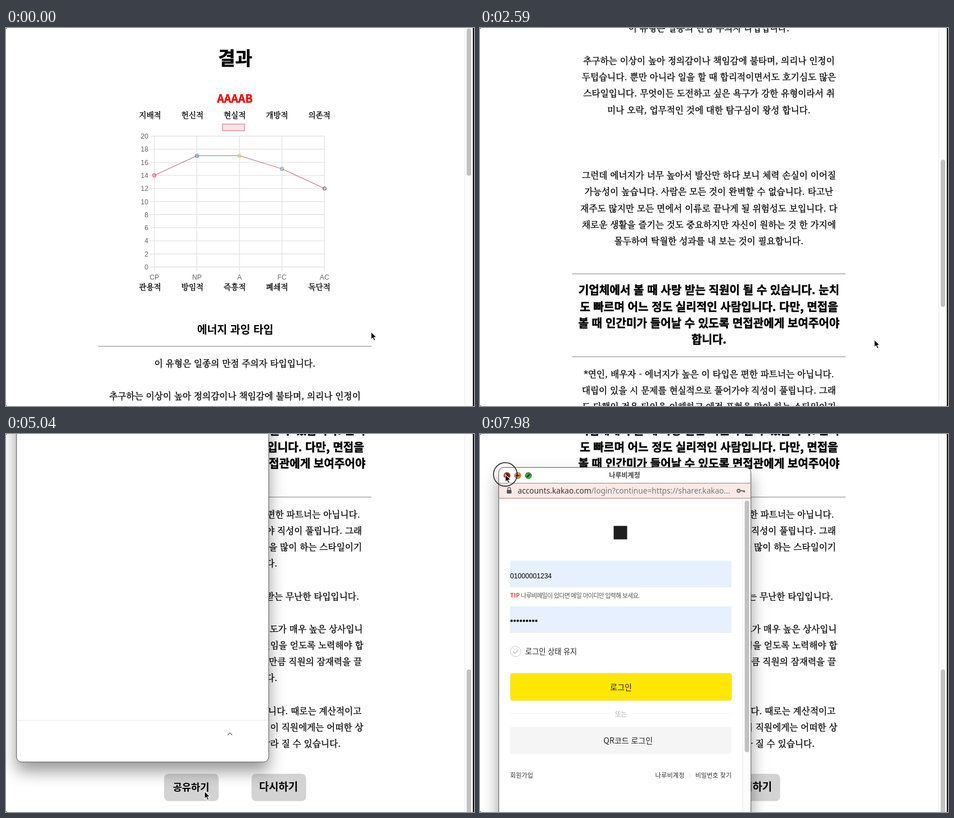
An HTML page that plays this animation: 832x673 px, repeating every 8 s.

```html
<!DOCTYPE html>
<html lang="ko">
<head>
<meta charset="utf-8">
<style>
html, body { margin: 0; width: 100%; height: 100%; overflow: hidden; background: #fff; }
svg { display: block; width: 832px; height: 673px; font-family: 'Noto Sans CJK KR', 'Noto Sans CJK', sans-serif; }
.serif { font-family: 'Noto Serif CJK KR', 'Noto Sans CJK KR', 'Noto Sans CJK', serif; stroke: #000; stroke-width: .4px; }
.pen { font-weight: 700; }
.heavy { font-weight: 900; stroke: currentColor; stroke-width: .5px; }
.red { fill: #f00b0b; color: #f00b0b; }
.arial { font-family: 'Liberation Sans', sans-serif; }
.url { font-family: 'Noto Sans', sans-serif; }
.shadow { filter: drop-shadow(0 16px 14px rgba(0, 0, 0, .4)); }
</style>
</head>
<body>
<svg id="stage" viewBox="0 0 832 673" text-anchor="middle"></svg>
<script>
const LOOP = 8000, STEP = 70, LINE = 29.17;
const LEFT = 'text-anchor="start"', RIGHT = 'text-anchor="end"';

// y is the vertical middle of the glyphs
const text = (x, y, str, size, attrs = '') =>
  `<text x="${x}" y="${y + size * .37}" font-size="${size}" ${attrs}>${str}</text>`;
const rect = (x, y, w, h, fill, attrs = '') =>
  `<rect x="${x}" y="${y}" width="${w}" height="${h}" fill="${fill}" ${attrs}/>`;
const line = (x1, y1, x2, y2, color, width = 1) =>
  `<path d="M${x1} ${y1}L${x2} ${y2}" stroke="${color}" stroke-width="${width}"/>`;
const paragraph = (y, size, cls, str) => str.split('\n')
  .map((row, i) => row && text(407, y + i * LINE, row, size, `class="${cls}"`)).join('');

function chart() {
  const X = i => 263.7 + i * 75.65, Y = v => 425.5 - v * 11.65;
  const values = [14, 17, 17, 15, 12];
  const colors = ['#d9626f', '#5a88b0', '#f2c05c', '#7299c4', '#84626f'];
  let out = rect(384.7, 171, 39.5, 12, '#ffe0e6', 'stroke="#c4727e"');
  for (let v = 0; v <= 20; v += 2)
    out += line(256, Y(v), X(4), Y(v), '#e4e4e4', 1.4) + text(253, Y(v), v, 12.2, `class="arial" fill="#666" ${RIGHT}`);
  ['CP', 'NP', 'A', 'FC', 'AC'].forEach((name, i) => {
    out += line(X(i), Y(20), X(i), 433, '#e4e4e4', 1.4) + text(X(i), 443, name, 12.2, 'class="arial" fill="#666"');
  });
  out += `<polyline points="${values.map((v, i) => X(i) + ',' + Y(v)).join(' ')}" fill="none" stroke="#c77d87" stroke-width="1.2"/>`;
  values.forEach((v, i) => {
    out += `<circle cx="${X(i)}" cy="${Y(v)}" r="3" fill="${colors[i]}" fill-opacity=".2" stroke="${colors[i]}" stroke-width="1.1"/>`;
  });
  const labels = (y, names) => names.split(' ')
    .map((name, i) => text(256.3 + i * 75.2, y, name, 13.6, 'class="serif"')).join('');
  return out + labels(155, '지배적 헌신적 현실적 개방적 의존적') + labels(461, '관용적 방임적 즉흥적 폐쇄적 독단적');
}

const page =
  text(407.5, 54, '결과', 33, 'class="heavy"') +
  text(407, 126, 'AAAAB', 19.6, 'class="heavy red"') + chart() +
  text(407.5, 537, '에너지 과잉 타입', 19.4, 'class="pen"') +
  [566.6, 1034.6, 1182.4].map(y => line(164, y, 650, y, '#999', 1.2)).join('') +
  paragraph(597, 15.65, 'serif', `이 유형은 일종의 만점 주의자 타입입니다.

추구하는 이상이 높아 정의감이나 책임감에 불타며, 의리나 인정이
두텁습니다. 뿐만 아니라 일을 할 때 합리적이면서도 호기심도 많은
스타일입니다. 무엇이든 도전하고 싶은 욕구가 강한 유형이라서 취
미나 오락, 업무적인 것에 대한 탐구심이 왕성 합니다.



그런데 에너지가 너무 높아서 발산만 하다 보니 체력 손실이 이어질
가능성이 높습니다. 사람은 모든 것이 완벽할 수 없습니다. 타고난
재주도 많지만 모든 면에서 이류로 끝나게 될 위험성도 보입니다. 다
채로운 생활을 즐기는 것도 중요하지만 자신이 원하는 것 한 가지에
몰두하여 탁월한 성과를 내 보는 것이 필요합니다.`) +
  paragraph(1064, 20.1, 'heavy', `기업체에서 볼 때 사랑 받는 직원이 될 수 있습니다. 눈치
도 빠르며 어느 정도 실리적인 사람입니다. 다만, 면접을
볼 때 인간미가 들어날 수 있도록 면접관에게 보여주어야
합니다.`) +
  paragraph(1213, 15.65, 'serif', `*연인, 배우자 - 에너지가 높은 이 타입은 편한 파트너는 아닙니다.
대립이 있을 시 문제를 현실적으로 풀어가야 직성이 풀립니다. 그래
도 다행인 것은 타인을 이해하고 애정 표현을 많이 하는 스타일이기
때문에 늘 즐겁습니다.

*거래처(고객) - 서로 줄건 주고, 받을 건 받는 무난한 타입입니다.

*상사 - 일에 대한 성과나 사람에 대한 관심도가 매우 높은 상사입니
다. 인간적인 역량과 업무적인 역량 모두 신임을 얻도록 노력해야 합
니다. 기대치가 높은 상사이기도 하지만 그만큼 직원의 잠재력을 끌
어 내주는 상사입니다.

*동료, 후배 직원 - 일은 똑 소리 나게 잘합니다. 때로는 계산적이고
타산적으로 비쳐 질 수도 있습니다. 하지만 이 직원에게는 어떠한 상
사를 만나느냐에 따라 성과가 매우 달라 질 수 있습니다.`) +
  rect(281, 1675, 97, 48.5, '#d3d3d3', 'rx="8"') + text(329, 1698, '공유하기', 17.6, 'class="pen"') +
  rect(436.5, 1675, 97, 48.5, '#d3d3d3', 'rx="8"') + text(484.5, 1698, '다시하기', 18.8, 'class="pen"');

const light = (x, fill, id) => `<circle ${id} cx="${x}" cy="-43.6" r="5.8" fill="${fill}" stroke="#0005"/>`;
const titleBar =
  text(242.5, -44.5, '나루비계정', 12, 'font-weight="700" fill="#444"') +
  light(33.4, '#e9573f', 'id="closeBtn"') + light(52.4, '#d98a35', '') + light(71.4, '#35a845', '') +
  `<path id="glyphs" d="M31 -46l4.8 4.8m0 -4.8l-4.8 4.8M49 -43.6h6.8M68.8 -41l5.2 -5.2" stroke="#2b1208" stroke-width="1.7"/>` +
  rect(19.5, -30, 447, 27.5, '#fbe9e7') + line(19.5, -30, 466.5, -30, '#8d8583') + line(19.5, -3, 466.5, -3, '#d5aaa6', 2) +
  rect(33, -18, 8.4, 6.5, '#555', 'rx="1"') + `<path d="M34.8 -18v-2a2.4 2.4 0 0 1 4.8 0v2" fill="none" stroke="#555" stroke-width="1.3"/>` +
  text(52.4, -16.5, 'accounts.kakao.com<tspan fill="#777">/login?continue=https://sharer.kakao...</tspan>', 13.7, `class="url" fill="#333" ${LEFT}`) +
  `<path d="M447.5 -16.5h8v3m-2.5 -3v2.5" fill="none" stroke="#666" stroke-width="1.8"/><circle cx="445.3" cy="-16.5" r="2.7" fill="none" stroke="#666" stroke-width="2"/>`;

const dots = Array.from({ length: 9 }, (_, i) => `<circle cx="${41.5 + i * 5.5}" cy="215" r="2.1"/>`).join('');
const tight = `letter-spacing="-.75" ${LEFT}`;
const form =
  rect(223, 46, 24, 24, '#1e1e1e') +
  line(39, 154.5, 432, 154.5, '#ddd') + line(39, 235.5, 432, 235.5, '#ddd') +
  '<g id="autofill">' + rect(39, 108, 393.5, 46, '#e6f0ff') + rect(39, 189, 393.5, 46, '#e6f0ff') +
  text(39, 134.5, '01000001234', 12.1, `class="arial" ${LEFT}`) + dots + '</g>' +
  text(39, 170, 'TIP', 10.5, `font-weight="700" fill="#c0563f" ${LEFT}`) +
  text(58, 170, '나루비메일이 있다면 메일 아이디만 입력해 보세요.', 11, `fill="#555" ${tight}`) +
  `<circle cx="48.6" cy="269.5" r="9.3" fill="none" stroke="#c8c8c8"/><path d="M44 269.5l3.5 3.5 6 -6.5" fill="none" stroke="#b5b5b5" stroke-width="1.3"/>` +
  text(66, 270, '로그인 상태 유지', 13.1, `fill="#222" ${LEFT}`) +
  rect(39.3, 308.5, 393.5, 48.5, '#ffe603', 'rx="4" stroke="#efe08a"') + text(236, 333, '로그인', 14, 'fill="#222"') +
  line(39, 380, 216, 380, '#f0f0f0') + line(256, 380, 432, 380, '#f0f0f0') + text(236, 381, '또는', 11.4, 'fill="#aaa"') +
  rect(39, 404, 393.5, 48, '#f5f5f5', 'rx="4"') + text(205, 428, 'QR코드 로그인', 14, `fill="#222" ${LEFT}`) +
  text(39, 490.5, '회원가입', 11.1, `fill="#333" ${LEFT}`) + text(297, 490.5, '나루비계정', 11.3, `fill="#333" ${LEFT}`) +
  line(358.5, 486, 358.5, 495, '#ddd') + text(432.5, 490.5, '비밀번호 찾기', 11.1, `fill="#333" ${RIGHT}`) +
  rect(452, -2, 14.5, 580, '#fcfcfc') + line(452.5, -2, 452.5, 583, '#ebebeb') + rect(456, 1, 8, 448, '#c1c1c1', 'rx="4"');

document.getElementById('stage').innerHTML =
  rect(0, 0, 832, 673, '#111') + rect(0, 0, 829.7, 673, '#fff', 'rx="2.5"') +
  `<g id="page">${page}</g>` +
  rect(815, 0, 14.7, 673, '#fcfcfc') + line(815.5, 0, 815.5, 673, '#ebebeb') + rect(819, 1, 8, 262, '#c1c1c1', 'rx="4" id="thumb"') +
  `<g id="popup">${rect(18.7, -58, 448.3, 642, '#fff', 'rx="9" stroke="#555" class="shadow"')}${titleBar}
  <g id="footer">${line(20, 510, 466, 510, '#e6e6e6')}<path d="M394 536l4 -4 4 4" fill="none" stroke="#666" stroke-width="1.2"/></g>
  <g id="form">${form}</g></g>
  <g id="cursor"><circle id="ring" r="21" fill="none" stroke="#111" stroke-width="1.4"/>
  <path d="M0 0V13.6L3.1 10.8 5.2 15.8 7.6 14.8 5.5 9.9 9.6 9.6Z" fill="#000" stroke="#fff" stroke-width="1.1"/></g>`;

const el = id => document.getElementById(id);
const smooth = p => p * p * (3 - 2 * p);
const flick = p => smooth(p ** .8);

// keys: [time, ...values]
function track(keys, t, ease) {
  const i = keys.findIndex(k => k[0] > t);
  if (i < 0) return keys[keys.length - 1].slice(1);
  const a = keys[Math.max(i - 1, 0)], b = keys[i];
  const p = ease(Math.max(0, (t - a[0]) / (b[0] - a[0])));
  return a.slice(1).map((v, n) => v + (b[n + 1] - v) * p);
}

const scrollKeys = [[70, 0], [420, 3], [700, 3], [1120, 125], [1260, 125], [1680, 258.7], [1750, 258.7],
  [2590, 597], [2660, 597], [2940, 780], [3150, 780], [3500, 1070]];
const cursorKeys = [[490, 649, 541], [630, 665, 546], [700, 665, 546], [1680, 676, 548], [1820, 676, 548],
  [2590, 701, 555], [3500, 701, 555], [3920, 350, 646], [4200, 350, 646], [4480, 353, 638], [4760, 353, 638],
  [4900, 353, 636], [5390, 353, 636], [5600, 329, 562], [5740, 329, 562], [6440, 101, 5], [6510, 95, -44],
  [7070, 95, -44], [7490, 109.6, 73.6], [7910, 45, 72]];
const dragKeys = [[7070, 0, 0], [7490, 14.6, 117.6]];
const openKeys = [[4270, 0], [4620, 1]];

const show = (id, on) => el(id).setAttribute('display', on ? 'inline' : 'none');
const move = (id, transform) => el(id).setAttribute('transform', transform);

function frame(now) {
  const t = Math.floor(now % LOOP / STEP) * STEP;
  const [scroll] = track(scrollKeys, t, flick);
  move('page', `translate(0 ${-scroll})`);
  move('thumb', `translate(0 ${scroll * .391})`);

  const [open] = track(openKeys, t, p => 1 - (1 - p) ** 2);
  const [dx, dy] = track(dragKeys, t, smooth);
  const size = .9 + .1 * open;
  show('popup', open > 0);
  el('popup').setAttribute('opacity', open);
  move('popup', `translate(${dx + 243 * (1 - size)} ${dy + 263 * (1 - size)}) scale(${size})`);
  show('footer', t >= 4830 && t < 5110);
  show('form', t >= 5110);
  show('autofill', t >= 5180);
  show('glyphs', t >= 7770);
  el('closeBtn').setAttribute('fill', t >= 7980 ? '#9c2d1c' : '#e9573f');

  const [x, y] = track(cursorKeys, t, smooth);
  move('cursor', `translate(${x} ${y})`);
  show('ring', t >= 7980 || t >= 4130 && t < 4270);
  requestAnimationFrame(() => frame(performance.now()));
}
frame(performance.now());
</script>
</body>
</html>
```
